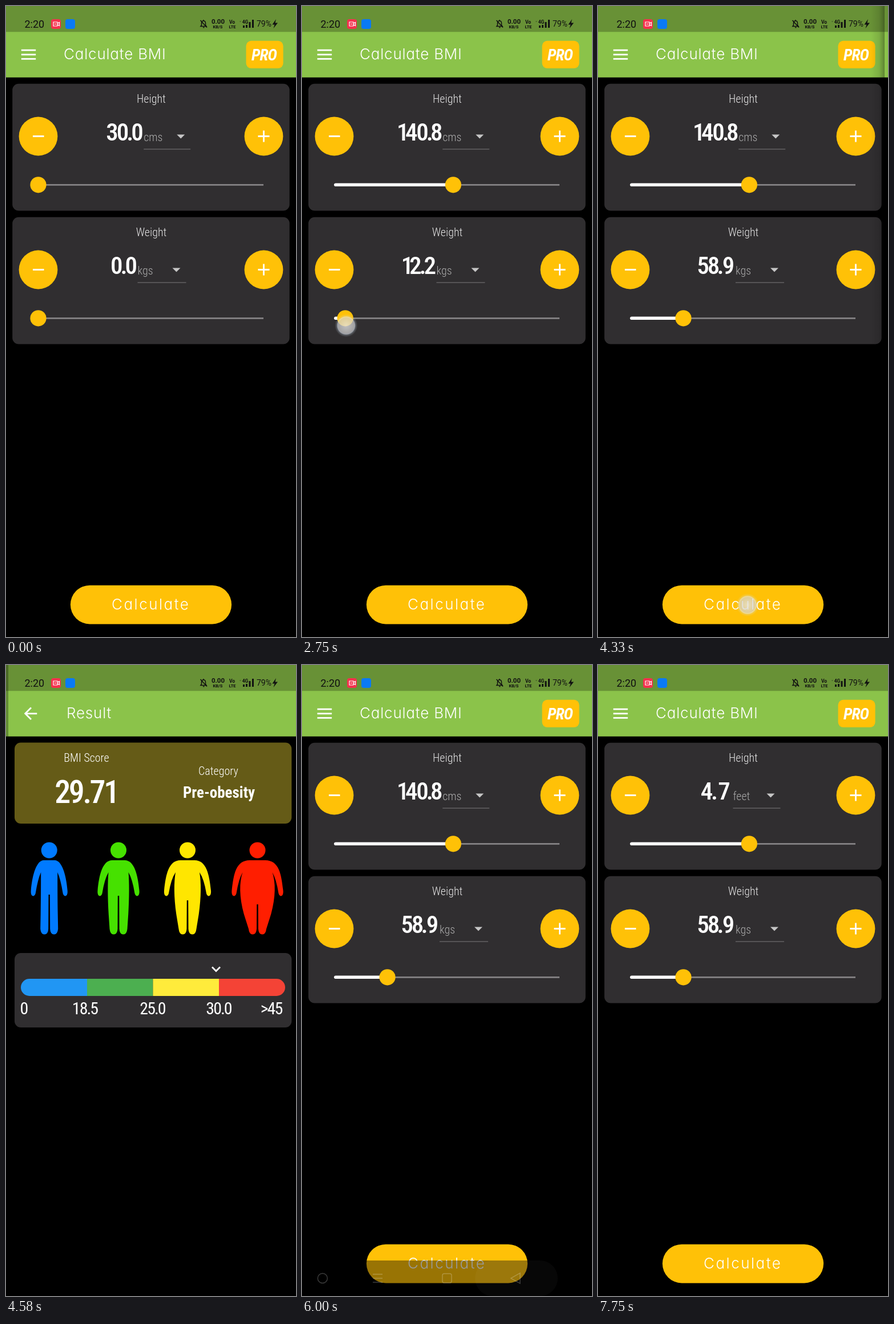
Recreate the animation shown at these times as an HTML page. Size 508 by 1102 pixels, loop 8 s.

```html
<!DOCTYPE html>
<html lang="en">
<head>
<meta charset="utf-8">
<title>BMI calculator</title>
<style>
  html, body { margin: 0; width: 100%; height: 100%; overflow: hidden; background: #000; }
  svg { display: block; width: 508px; height: 1102px; }
  text { fill: #fff; white-space: pre; }
  .round { font: 300 26px Inter, Lato, sans-serif; font-feature-settings: "cv11"; letter-spacing: .8px; }
  .hand { font: 300 20px "Roboto Condensed", "Open Sans Condensed", Roboto, sans-serif; font-stretch: 75%; }
  .mid { text-anchor: middle; }
  .value { font-size: 43px; font-weight: 500; }
  .unit { fill: #aaa; }
  .score { font-size: 56px; font-weight: 500; letter-spacing: -3.5px; }
  .mark { font-size: 30px; font-weight: 400; letter-spacing: -2px; }
  .strong { font-size: 27px; font-weight: 700; }
  .pro { font-size: 28px; font-style: italic; letter-spacing: -1px; }
  .status text { font-family: Roboto, sans-serif; fill: #111; }
  .line { fill: none; stroke: #fff; stroke-width: 2.8; }
  .nav { fill: none; stroke: #fff; stroke-opacity: .24; stroke-width: 1.4; }
  .card { fill: #302e30; }
  .accent { fill: #ffc107; }
</style>
</head>
<body>
<svg viewBox="0 0 508 1102">
  <defs>
    <linearGradient id="edge">
      <stop stop-opacity="0"/><stop offset=".6" stop-opacity=".1"/><stop offset="1" stop-opacity=".32"/>
    </linearGradient>
    <radialGradient id="touch">
      <stop offset="0" stop-color="#e4e4e4" stop-opacity=".8"/>
      <stop offset=".66" stop-color="#d2d2d2" stop-opacity=".72"/>
      <stop offset=".76" stop-color="#e6ecf6" stop-opacity=".6"/>
      <stop offset=".82" stop-color="#cfe2f2" stop-opacity=".25"/>
      <stop offset="1" stop-color="#cfe2f2" stop-opacity="0"/>
    </radialGradient>
    <clipPath id="pill"><rect x="22" y="548" width="463" height="30" rx="15"/></clipPath>
    <g id="bars">
      <path fill="#8bc34a" d="M0 45H508V124.700H0z"/><path fill="#689136" d="M0 0H508V45.200H0z"/>
    </g>
  </defs>

  <g>
    <use href="#bars"/>
    <path class="line" d="M26.800 77.200H52.200M26.800 84.800H52.200M26.800 92.400H52.200"/>
    <text class="round" x="101" y="93">Calculate BMI</text>
    <rect class="accent" x="420.600" y="60.800" width="65" height="48" rx="9"/>
    <text class="hand strong pro mid" x="452" y="94.500">PRO</text>
    <g id="panels"></g>
    <rect class="accent" x="112.900" y="1011.700" width="282.200" height="67.700" rx="33.800"/>
    <text class="round" x="185" y="1054" style="letter-spacing:2.500px">Calculate</text>
    <g id="menu">
      <rect x="222" width="139" rx="3" fill="#0e0e0e" style="filter:drop-shadow(0 4px 6px #0006)"/>
      <g class="hand"><text x="245" y="236">cms</text><text x="245" y="304">feet</text></g>
    </g>
  </g>

  <g id="result">
    <path fill="url(#edge)" d="M-24 0H0V1102H-24z"/>
    <path d="M0 0H508V1102H0z"/>
    <use href="#bars"/>
    <path class="line" d="M50.300 84.800H30M40 74.500L29.700 84.800L40 95.100"/>
    <text class="round" x="102" y="93">Result</text>
    <rect x="11" y="135.600" width="485.300" height="141.400" rx="11" fill="#655b17"/>
    <text class="hand mid" x="137" y="169">BMI Score</text>
    <text class="hand mid score" x="136.500" y="241">29.71</text>
    <text class="hand mid" x="368" y="191.500">Category</text>
    <text class="hand mid strong" x="369" y="232">Pre-obesity</text>
    <g id="people"></g>
    <rect class="card" x="11" y="503" width="485.300" height="130" rx="11"/>
    <path class="line" d="M357 527.500L364 534.500L371 527.500"/>
    <g clip-path="url(#pill)">
      <path fill="#2196f3" d="M22 548H138V578H22z"/><path fill="#4caf50" d="M138 548H253.500V578H138z"/>
      <path fill="#ffeb3b" d="M253.500 548H369V578H253.500z"/><path fill="#f44336" d="M369 548H485V578H369z"/>
    </g>
    <g class="hand mid mark">
      <text x="27" y="610">0</text><text x="134" y="610">18.5</text><text x="252.500" y="610">25.0</text>
      <text x="368.500" y="610">30.0</text><text x="460.500" y="610">&gt;45</text>
    </g>
  </g>

  <g class="status" fill="#111">
    <text x="32.500" y="37.500" font-size="18">2:20</text>
    <rect x="79" y="23" width="17" height="17" rx="4" fill="#f5314d"/>
    <path class="line" style="stroke-width:1.200" d="M83 28H90V35H83zM90 30.500L93.500 28.500V34.500L90 32.500M85 31.500H88"/>
    <rect x="104" y="23" width="17" height="17" rx="4" fill="#0a7af5"/>
    <path d="M341 35.500H351L349.500 33.500V30Q349.500 26 346 26Q342.500 26 342.500 30V33.500zM340.500 25L352 37.500M345 37.500H347.500M346 24V26" fill="none" stroke="#111" stroke-width="1.500"/>
    <g class="mid" font-weight="700">
      <text x="371.500" y="31" font-size="11.500">0.00</text><text x="371" y="39" font-size="7.500">KB/S</text>
      <text x="396" y="30.500" font-size="8.500">Vo</text><text x="396.500" y="38.500" font-size="7.500">LTE</text>
      <text x="419" y="31" font-size="8.500">4G</text>
    </g>
    <path d="M415 34H418V38H415zM420 33H423V38H420zM425.500 28H428.500V38H425.500zM431 24H434V38H431z"/>
    <path d="M409.500 26H411.500V28H409.500z" opacity=".3"/>
    <text x="439" y="36" font-size="14">79%</text>
    <path d="M473 23L466.500 32.500H470.500L468.500 39L476 29.500H471.500z"/>
  </g>

  <g id="nav">
    <path d="M0 1040H508V1102H0z" opacity=".4"/>
    <rect id="ripple" x="303" y="1040" width="145" height="62" rx="31" fill="#fff"/>
    <g class="nav">
      <circle cx="36" cy="1071" r="8.500"/>
      <path d="M124 1064H141M124 1071H141M124 1078H141M382 1062V1080L366 1071z"/>
      <rect x="246" y="1063" width="16" height="16" rx="3"/>
    </g>
  </g>
  <circle id="finger" r="20" fill="url(#touch)"/>
</svg>
<script>
const LOOP = 8000;
const $ = id => document.getElementById(id);
const set = (el, attrs) => Object.entries(attrs).forEach(([k, v]) => el.setAttribute(k, v));
const clamp = v => Math.max(0, Math.min(1, v));

// Linear interpolation through [time, value] pairs.
function track(t, ...keys) {
  let i = 1;
  while (i < keys.length - 1 && t > keys[i][0]) i++;
  const [[t0, v0], [t1, v1]] = [keys[i - 1], keys[i]];
  return v0 + (v1 - v0) * clamp((t - t0) / (t1 - t0));
}

const panel = (label, dy) => `<g transform="translate(0 ${dy})">
  <rect class="card" x="11.2" y="135.700" width="485.500" height="221.700" rx="11"/>
  <text class="hand mid" x="254.500" y="169" fill-opacity=".87">${label}</text>
  <circle class="accent" cx="56.500" cy="227.500" r="33.900"/><circle class="accent" cx="451.500" cy="227.500" r="33.900"/>
  <path class="line" d="M47 227.500H66.500M441.500 227.500H461.500M451.500 217.500V237.500"/>
  <text class="hand value mid" y="235"></text>
  <g class="select"><text class="hand unit" y="236"></text>
    <path class="arrow" fill="#c6c6c6"/><path class="rule" stroke="#7c7a7c"/></g>
  <path d="M56 312.300H451" stroke="#848284" stroke-width="2.800"/>
  <path class="active" stroke="#fff" stroke-width="5.600" stroke-linecap="round"/>
  <circle class="thumb accent" cy="312.300" r="14.100"/></g>`;
$('panels').innerHTML = panel('Height', 0) + panel('Weight', 233);
const [heightPanel, weightPanel] = $('panels').children;

const advance = { '.': 7, 1: 10, 4: 20, 5: 20, 6: 20, 7: 27, 8: 17, 9: 21 };
const selectWidth = { cms: 82, kgs: 85, feet: 83 };

function updatePanel(el, value, unit, thumb) {
  const part = name => el.querySelector('.' + name);
  const digits = [...value.toFixed(1)];
  const cells = digits.map(d => advance[d] || 18.5);
  const width = cells.reduce((a, b) => a + b);
  const select = selectWidth[unit];
  const left = 251 + (width - select) / 2;
  let x = left - width - 2;
  part('value').textContent = digits.join('');
  set(part('value'), { x: cells.map(w => (x += w) - w / 2).join(' ') });
  part('unit').textContent = unit;
  set(part('select'), { transform: `translate(${left} 0)` });
  set(part('arrow'), { d: `M${select - 24} 224.500h14l-7 7z` });
  set(part('rule'), { d: `M0 250H${select}` });
  set(part('active'), { d: `M59 312.300H${Math.max(59, thumb)}`, opacity: thumb > 58 ? 1 : 0 });
  set(part('thumb'), { cx: thumb });
}

// One half of a standing figure; side is 1 or -1.
function half(side, arm, pit, hip, foot, crotch) {
  const p = (x, y) => `${side * x} ${y} `;
  return `<path d="M${p(-.5, 341)}L${p(arm * .3, 341)}C${p(arm * 1.25 - 18, 341)}${p(arm * .93, 366)}${p(arm, 394)}
    C${p(arm + 1, 405)}${p(arm - 6, 406)}${p(arm - 8, 399)}Q${p(arm - 12, 374)}${p(pit, 362)}
    C${p(hip, 380)}${p(hip, 405)}${p((hip + foot) / 2, 435)}L${p(foot, 461)}
    Q${p(foot - 1, 470.5)}${p(foot * .55, 470.5)}Q${p(2, 470.5)}${p(1.5, 461)}L${p(1.2, crotch)}L${p(-.5, crotch)}z"/>`;
}
const person = (x, color, ...shape) => `<g transform="translate(${x} 0)" fill="${color}">
  <circle cy="323.500" r="14"/>${half(1, ...shape)}${half(-1, ...shape)}</g>`;
$('people').innerHTML =
  person(71.7, '#007aff', 32, 14.5, 14.5, 15.5, 401) + person(193, '#46e100', 36.5, 17.5, 19, 15.5, 403) +
  person(314, '#ffe600', 41, 21, 24, 15.5, 411) + person(436.5, '#ff1e00', 45, 26, 32, 15.5, 418);

// Touches: start, end, from x, y, to x, y.
const touches = [
  [2540, 3420, 57, 548, 169, 603], [3560, 3900, 172, 597, 150, 592], [4150, 4420, 262, 1046, 262, 1046],
  [5160, 5360, 400, 1098, 400, 1062], [5480, 5710, 396, 1090, 396, 1090],
  [6640, 6840, 292, 230, 292, 230], [7250, 7440, 285, 296, 285, 296]
];
function touchAt(t) {
  if (t > 600 && t < 2330) {
    const x = track(t, [830, 57], [1250, 112], [1500, 112], [1580, 126], [2250, 268]);
    return [600, 2330, x, 309];
  }
  const hit = touches.find(([a, b]) => t >= a && t <= b);
  if (!hit) return null;
  const [a, b, x0, y0, x1, y1] = hit;
  return [a, b, track(t, [a + 80, x0], [b - 80, x1]), track(t, [a + 80, y0], [b - 80, y1])];
}

function draw(t) {
  const height = track(t, [830, 30], [1250, 58], [1500, 58], [1580, 61.3], [2330, 140.8]);
  const weight = track(t, [2620, 0], [3330, 66], [3580, 66], [3900, 58.9]);
  const inFeet = t >= 7580;
  updatePanel(heightPanel, inFeet ? 4.7 : height, inFeet ? 'feet' : 'cms', 56.5 + (height - 30) * 395 / 210);
  updatePanel(weightPanel, weight, 'kgs', 56.5 + weight * 395 / 250);

  const entering = (1 - clamp((t - 4330) / 400)) ** 5;
  const leaving = 1 - (1 - clamp((t - 5583) / 420)) ** 2.45;
  const offset = Math.round(508 * (t < 5000 ? entering : leaving));
  set($('result'), { transform: `translate(${offset} 0)`, visibility: offset < 508 ? 'visible' : 'hidden' });

  const grow = track(t, [6980, 0], [7100, 1]);
  const [sheet, items] = $('menu').children;
  set($('menu'), { opacity: track(t, [6900, 0], [6977, 1], [7490, 1], [7580, 0]) });
  set(sheet, { y: 194 - 11 * grow, height: 67.5 + 90 * grow });
  set(items, { opacity: track(t, [7030, 0], [7150, 1]) });

  set($('nav'), { opacity: track(t, [5250, 0], [5420, 1], [7120, 1], [7330, 0]) });
  set($('ripple'), { opacity: track(t, [5480, 0], [5560, .1], [5800, .1], [6080, 0]) });

  const touch = touchAt(t);
  set($('finger'), { opacity: touch ? clamp(Math.min(t - touch[0], touch[1] - t) / 60) : 0 });
  if (touch) set($('finger'), { cx: touch[2], cy: touch[3] });
}

function tick() {
  draw(performance.now() % LOOP);
  requestAnimationFrame(tick);
}
tick();
</script>
</body>
</html>
```
